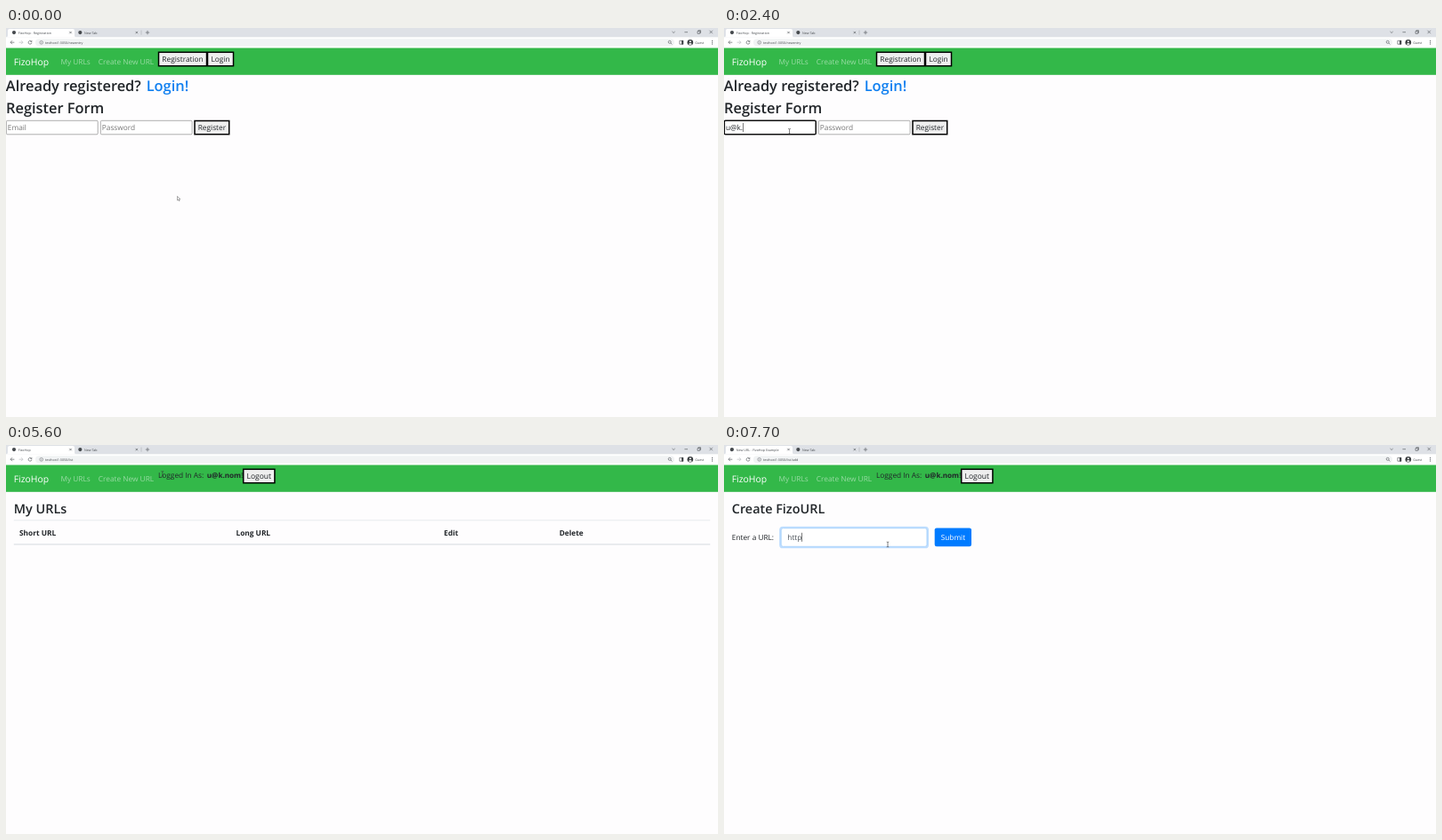
Write an HTML page that moves like this. It is 800 px wide and 438 px high and loops after 8000 ms.

```html
<!DOCTYPE html>
<html lang="en">
<head>
<meta charset="utf-8">
<title>FizoHop</title>
<style>
  html, body { margin: 0; width: 100%; height: 100%; overflow: hidden; background: #fefdfe; }
  svg { display: block; width: 100%; height: 100%; }
  text { font: 8.3px "Open Sans", "Noto Sans", sans-serif; fill: #212529; text-rendering: geometricPrecision; white-space: pre; }
  .tiny { font-size: 3.65px; fill: #45494d; }
  .brand { font-size: 10.4px; fill: #fff; }
  .link { fill: #fff; fill-opacity: .5; }
  .h2 { font-size: 16.4px; font-weight: 600; }
  .h3 { font-size: 14.4px; font-weight: 600; }
  .bold { font-weight: 700; }
  .mid { text-anchor: middle; }
  .hint { fill: #757575; }
  .icon { fill: none; stroke: #5f6368; stroke-width: .7; }
  .btn { fill: #efefef; stroke: #000; stroke-width: 1.5; }
  .field { fill: #fff; stroke: #767676; stroke-width: .6; }
  .field.on { stroke: #101010; stroke-width: 1.5; }
</style>
</head>
<body>
<svg viewBox="0 0 800 438" preserveAspectRatio="none">
  <rect width="800" height="438" fill="#fefdfe"/>

  <!-- browser bar -->
  <rect width="800" height="11" fill="#dee1e6"/>
  <path d="M0 10.5Q2 10.5 2 8.5V3Q2 1 4 1H75Q77 1 77 3V8.5Q77 10.5 79 10.5Z" fill="#fff"/>
  <rect y="10.3" width="800" height="12.2" fill="#fff"/>
  <rect x="33" y="12.2" width="718" height="8.2" rx="4.1" fill="#f1f3f4"/>
  <circle id="favicon" cx="9" cy="5.1" r="2.1" fill="#45494d"/>
  <circle cx="83.3" cy="5.1" r="2.1" fill="#45494d"/>
  <text id="title" class="tiny" x="13.8" y="6.5"></text>
  <text class="tiny" x="88" y="6.5">New Tab</text>
  <path class="icon" d="M71.3 3.9l2.4 2.4m0-2.4l-2.4 2.4M145.6 3.9l2.4 2.4m0-2.4l-2.4 2.4M156.8 5.1h4.4M159 2.9v4.4"/>
  <path class="icon" d="M152 2.6v5" style="stroke:#9da1a6;stroke-width:.5"/>
  <path class="icon" d="M748.5 4l1.6 1.5L751.700 4M762.400 4.700h3.600M790.500 2.800l3.400 3.400m0-3.400l-3.400 3.400M777 3.600h2.700v2.700h-2.700zM777.800 3.500v-.8h2.700v2.700h-.8"/>
  <path class="icon" d="M9.400 16.200H5M7 14.200l-2 2 2 2"/>
  <path class="icon" d="M14.600 16.200H19M17 14.200l2 2-2 2" style="stroke:#b9bcc0"/>
  <path id="reload" class="icon" d="M28.400 14.900A1.900 1.900 0 1 0 28.900 16.500M28.900 14v1.500h-1.500"/>
  <path id="stop" class="icon" d="M25.300 14.500l3.400 3.400m0-3.400l-3.400 3.400"/>
  <circle class="icon" cx="39.700" cy="16.300" r="1.900" style="stroke-width:.5"/>
  <path class="icon" d="M39.700 16v1.300M39.700 15v.4" style="stroke-width:.5"/>
  <text id="address" class="tiny" x="44" y="17.700"></text>
  <circle class="icon" cx="745.700" cy="15.800" r="1.500"/>
  <path class="icon" d="M746.800 16.900l1.500 1.500M756.900 14.300h3.900v3.900h-3.900z"/>
  <rect x="759" y="14" width="2.100" height="4.500" fill="#45494d"/>
  <circle cx="768.800" cy="16.300" r="3.300" fill="#3c4043"/>
  <circle cx="768.800" cy="15.300" r="1" fill="#fff"/>
  <path d="M766.800 18.200q2-2.200 4 0q-2 1.200-4 0z" fill="#fff"/>
  <text class="tiny" x="774.300" y="17.600">Guest</text>
  <path d="M793.500 14v1m0 .8v1m0 .8v1" stroke="#45494d" stroke-width=".9"/>

  <!-- navigation -->
  <rect y="22.500" width="800" height="30.300" fill="#33b849"/>
  <text class="brand" x="8.700" y="41.900">FizoHop</text>
  <text class="link" x="61.500" y="41">My URLs</text>
  <text class="link" id="newLink" x="103.800" y="41">Create New URL</text>

  <g id="register">
    <rect class="btn" x="171.500" y="27.300" width="54" height="15.400"/>
    <text class="mid" x="198.500" y="38.300">Registration</text>
    <rect class="btn" x="226.500" y="27.300" width="29" height="15.400"/>
    <text class="mid" x="241" y="38.300">Login</text>
    <text class="h2" x="-.2" y="70.600">Already registered?</text>
    <text class="h2" x="157.700" y="70.600" style="fill:#0f7ff0">Login!</text>
    <text class="h2" x="0" y="96.200">Register Form</text>
    <rect id="mailBox" class="field" x=".4" y="104.300" width="102.800" height="15.500" rx="1.300"/>
    <text id="mailHint" class="hint" x="1.800" y="115.300">Email</text>
    <text id="mail" x="1.900" y="115.300"></text>
    <rect id="passBox" class="field" x="106.300" y="104.300" width="102.800" height="15.500" rx="1.300"/>
    <text id="passHint" class="hint" x="107.800" y="115.300">Password</text>
    <g id="dots"></g>
    <rect class="btn" x="212" y="104.500" width="38.700" height="15.200"/>
    <text class="mid" x="231.400" y="115.300">Register</text>
  </g>

  <g id="account">
    <text x="171" y="36.800">Logged In As:</text>
    <text class="bold" x="225.800" y="36.800" style="font-size:8.1px">u@k.nom</text>
    <text x="264" y="36.800">!</text>
    <rect class="btn" x="266.700" y="27.300" width="35.200" height="15.400"/>
    <text class="mid" x="284.300" y="38.300" style="font-size:8.500px">Logout</text>
  </g>

  <g id="list">
    <text class="h3" x="8.800" y="77.200">My URLs</text>
    <path d="M8.800 84.800H791.200" stroke="#dee2e6" stroke-width=".7"/>
    <path d="M8.800 111.800H791.200" stroke="#dee2e6" stroke-width="1.200"/>
    <g class="heads"></g>
  </g>

  <g id="create">
    <text class="h3" x="8.800" y="77.200">Create FizoURL</text>
    <text x="8.800" y="107">Enter a URL:</text>
    <rect id="glow" x="63.100" y="92.600" width="166" height="22.800" rx="3" fill="none" stroke="#bfdeff" stroke-width="1.900"/>
    <rect x="64.200" y="93.700" width="163.800" height="20.600" rx="2.200" fill="#fff" stroke="#8fc4fb" stroke-width=".7"/>
    <text id="urlHint" x="71.300" y="107" style="fill:#6c757d">http://</text>
    <text id="url" x="71.300" y="107" style="fill:#495057"></text>
    <rect x="236.700" y="93.400" width="41.300" height="20.800" rx="2.200" fill="#007bff"/>
    <text class="mid" x="257.400" y="107" style="fill:#fff">Submit</text>
  </g>

  <rect id="caret" width=".6" height="10" fill="#222"/>
  <g id="cursor">
    <path id="arrow" d="M0 0V4.600L1.100 3.600L1.900 5.300L2.600 5L1.900 3.300H3.300Z" fill="#fff" stroke="#444" stroke-width=".45"/>
    <path id="beam" d="M-1.300-2.900Q0-2.900 0-2.200Q0-2.900 1.300-2.900M0-2.200V2.200M-1.300 2.900Q0 2.900 0 2.200Q0 2.900 1.300 2.900" fill="none" stroke="#333" stroke-width=".6"/>
    <path id="hand" d="M-.5 0Q0-.6.500 0V2L2.600 2.500V4.500L2 6H-.8L-2 3.700L-1.400 3.300L-.5 4Z" fill="#fff" stroke="#333" stroke-width=".45"/>
  </g>
</svg>

<script>
const LOOP = 8000, STEP = 100;
const SVG = "http://www.w3.org/2000/svg";
const $ = id => document.getElementById(id);

const mailText = "u@k.nom", urlText = "http";
const mailKeys = [1800, 2100, 2300, 2400, 2600, 2700, 2900];
const passKeys = [3800, 4000, 4200, 4300];
const urlKeys = [7200, 7300, 7500, 7700];

// [time, value] rows; the last row reached applies
const pages = [[0, "register"], [4800, "list"], [6600, "create"]];
const pointers = [[0, "arrow"], [1000, "beam"], [4600, "arrow"], [5600, "beam"],
  [5700, "hand"], [6300, "arrow"], [6500, "beam"]];
const titles = {
  register: ["FizoHop - Registration", "testhost1:3050/newentry"],
  list: ["FizoHop", "testhost1:3050/list"],
  create: ["New URL - FizoHop Example", "testhost1:3050/list/add"]
};

// [time, x, y] of the pointer
const path = [[0, 192.5, 189.500], [900, 76, 122], [1300, 73.500, 116.300], [4500, 73.500, 116.300],
  [4600, 70.300, 113], [5100, 70.300, 113], [5600, 175.800, 32.500], [6000, 150, 37],
  [6100, 150, 37], [6600, 184, 112], [8000, 184, 112]];

const at = (rows, t) => rows.filter(r => r[0] <= t).pop()[1];
const count = (keys, t) => keys.filter(k => k <= t).length;
const within = (t, a, b) => t >= a && t < b;
const show = (id, on) => { $(id).style.display = on ? "" : "none"; };
const ease = u => u * u * (3 - 2 * u);

function add(parent, tag, attrs, text) {
  const el = document.createElementNS(SVG, tag);
  for (const k in attrs) el.setAttribute(k, attrs[k]);
  if (text) el.textContent = text;
  parent.append(el);
  return el;
}

const heads = document.querySelector(".heads");
[[15, "Short URL"], [258.5, "Long URL"], [492, "Edit"], [621.7, "Delete"]]
  .forEach(([x, s]) => add(heads, "text", { x, y: 101.5, class: "bold" }, s));
const dots = passKeys.map((_, i) =>
  add($("dots"), "circle", { cx: 110 + i * 3.6, cy: 112.4, r: 1.15, fill: "#212529" }));

function pointAt(t) {
  const i = Math.max(1, path.findIndex(p => p[0] >= t));
  const [a, x0, y0] = path[i - 1], [b, x1, y1] = path[i];
  const u = ease((t - a) / (b - a));
  return [x0 + (x1 - x0) * u, y0 + (y1 - y0) * u];
}

function typed(id, text, n) {
  $(id).textContent = text.slice(0, n);
  show(id + "Hint", n === 0);
  return n ? $(id).getComputedTextLength() : 0;
}

function draw(t) {
  const page = at(pages, t);
  ["register", "list", "create"].forEach(p => show(p, p === page));
  show("account", page !== "register");
  $("title").textContent = titles[page][0];
  $("address").textContent = titles[page][1];
  const loading = within(t, 4600, 4800);
  show("favicon", !within(t, 4600, 5200));
  show("stop", loading);
  show("reload", !loading);

  $("mailBox").classList.toggle("on", within(t, 1300, 3100));
  $("passBox").classList.toggle("on", within(t, 3100, 4800));
  const nPass = count(passKeys, t);
  dots.forEach((d, i) => { d.style.display = i < nPass ? "" : "none"; });
  show("passHint", nPass === 0);
  const mailWidth = typed("mail", mailText, count(mailKeys, t));
  const urlWidth = typed("url", urlText, count(urlKeys, t));
  $("glow").style.opacity = Math.min(1, Math.max(0, (t - 6600) / 300));
  $("newLink").style.fillOpacity = within(t, 5700, 6300) ? .75 : .5;

  let x = null, y = 107;
  if (within(t, 1800, 3100)) x = 2 + mailWidth;
  else if (within(t, 3100, 3600)) x = 107.4;
  else if (within(t, 3800, 4800)) x = 108.2 + nPass * 3.6;
  else if (t >= 6600) { x = 71 + urlWidth; y = 98.800; }
  show("caret", x !== null);
  if (x !== null) {
    $("caret").setAttribute("x", x);
    $("caret").setAttribute("y", y);
  }

  const kind = at(pointers, t);
  ["arrow", "beam", "hand"].forEach(k => show(k, k === kind));
  $("cursor").setAttribute("transform", `translate(${pointAt(t)})`);
}

let start = null;
function tick(now) {
  if (start === null) start = now;
  draw(Math.floor(((now - start) % LOOP) / STEP) * STEP);
  requestAnimationFrame(tick);
}
draw(0);
requestAnimationFrame(tick);
</script>
</body>
</html>
```
